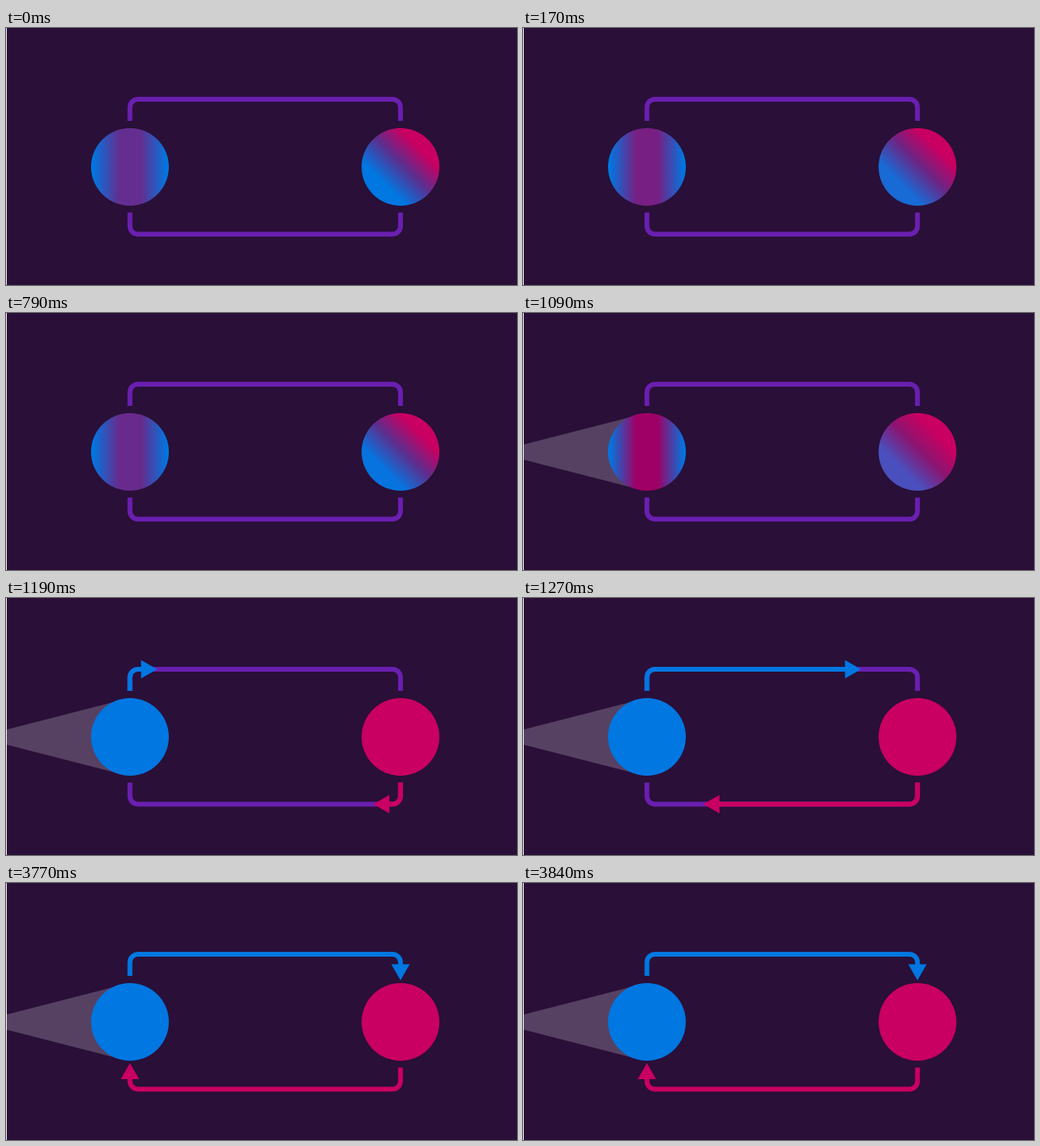
An HTML page with a canvas that plays this animation: 637 by 321 pixels, repeating every 4220 ms.

```html
<!DOCTYPE html>
<html lang="en">
<head>
<meta charset="utf-8">
<title>Two-way exchange</title>
<style>
  html, body { margin: 0; width: 100%; height: 100%; overflow: hidden; background: #2a0f38; }
  canvas { display: block; width: 637px; height: 321px; }
</style>
</head>
<body>
<canvas id="stage"></canvas>
<script>
const W = 637, H = 321, LOOP = 4220;
const BLUE = [0, 119, 225], PINK = [201, 0, 97];
const LEFT = 154.5, RIGHT = 491.75, MID_Y = 173.5, RADIUS = 48.5;
const TOP = 89, START_Y = 116, END_Y = 102, CORNER = 10;

// The picture steps at these times and holds in between.
const STEPS = [0, 70, 140, 210, 270, 340, 410, 470, 560, 660, 730, 790,
  860, 930, 1010, 1090, 1190, 1270, 1350];
const SEND = 1190;

const canvas = document.getElementById('stage');
const ctx = canvas.getContext('2d');
const dpr = window.devicePixelRatio || 1;
canvas.width = W * dpr;
canvas.height = H * dpr;

const clamp = x => Math.max(0, Math.min(1, x));
const rgb = c => `rgb(${c.map(Math.round).join(',')})`;
const mix = (a, b, k) => a.map((v, i) => v + (b[i] - v) * k);

function disc(x, fill) {
  ctx.fillStyle = fill;
  ctx.beginPath();
  ctx.arc(x, MID_Y, RADIUS, 0, Math.PI * 2);
  ctx.fill();
}

function gradient(x0, y0, x1, y1, stops) {
  const g = ctx.createLinearGradient(x0, y0, x1, y1);
  stops.forEach(([at, color]) => g.addColorStop(at, rgb(color)));
  return g;
}

// Draws in the given half: 0 = upper, 1 = lower (upper turned by 180 degrees).
function inHalf(half, draw) {
  ctx.save();
  if (half) {
    ctx.translate(LEFT + RIGHT, 2 * MID_Y - 0.5);
    ctx.rotate(Math.PI);
  }
  draw();
  ctx.restore();
}

function strokeRoute(color, endY, length) {
  ctx.strokeStyle = color;
  ctx.lineWidth = 6;
  ctx.setLineDash(length === undefined ? [] : [length, 2000]);
  ctx.beginPath();
  ctx.moveTo(LEFT, START_Y);
  ctx.arcTo(LEFT, TOP, RIGHT, TOP, CORNER);
  ctx.arcTo(RIGHT, TOP, RIGHT, endY, CORNER);
  ctx.lineTo(RIGHT, endY);
  ctx.stroke();
  ctx.setLineDash([]);
}

const RISE = START_Y - TOP - CORNER;
const BEND = CORNER * Math.PI / 2;
const SPAN = RIGHT - LEFT - 2 * CORNER;
const ROUTE = RISE + 2 * BEND + SPAN + END_Y - TOP - CORNER;

// Position and heading after travelling d along the route.
function pointAt(d) {
  if (d < RISE) return [LEFT, START_Y - d, -Math.PI / 2];
  d -= RISE;
  if (d < BEND) {
    const a = d / CORNER;
    return [LEFT + CORNER * (1 - Math.cos(a)), TOP + CORNER * (1 - Math.sin(a)), a - Math.PI / 2];
  }
  d -= BEND;
  if (d < SPAN) return [LEFT + CORNER + d, TOP, 0];
  d -= SPAN;
  if (d < BEND) {
    const a = d / CORNER;
    return [RIGHT - CORNER * (1 - Math.sin(a)), TOP + CORNER * (1 - Math.cos(a)), a];
  }
  return [RIGHT, TOP + CORNER + d - BEND, Math.PI / 2];
}

function arrow(color, progress) {
  const d = ROUTE * progress;
  strokeRoute(color, END_Y, d);
  const [x, y, angle] = pointAt(d);
  ctx.save();
  ctx.translate(x, y);
  ctx.rotate(angle);
  ctx.fillStyle = color;
  ctx.beginPath();
  ctx.moveTo(-0.5, -11.5);
  ctx.lineTo(19.5, 0);
  ctx.lineTo(-0.5, 11.5);
  ctx.fill();
  ctx.restore();
}

function beam(alpha) {
  ctx.globalAlpha = alpha;
  ctx.fillStyle = '#564162';
  ctx.beginPath();
  ctx.moveTo(0, 164.5);
  ctx.lineTo(142, 128);
  ctx.lineTo(142, 219.5);
  ctx.lineTo(0, 183);
  ctx.fill();
  ctx.globalAlpha = 1;
}

function mixedDiscs(t) {
  const k = 0.5 - 0.5 * Math.cos(t / 720 * Math.PI * 2);
  const core = mix([99, 46, 144], [159, 0, 101], k);
  disc(LEFT, gradient(LEFT - RADIUS, 0, LEFT + RADIUS, 0,
    [[0.02, BLUE], [0.36, core], [0.64, core], [0.98, BLUE]]));

  const low = mix(BLUE, [73, 80, 190], k);
  const middle = mix([92, 46, 142], [140, 20, 112], k);
  const r = RADIUS * Math.SQRT1_2;
  disc(RIGHT, gradient(RIGHT - r, MID_Y + r, RIGHT + r, MID_Y - r,
    [[0.2, low], [0.54, middle], [0.84, PINK]]));
}

function draw(t) {
  ctx.setTransform(dpr, 0, 0, dpr, 0, 0);
  ctx.fillStyle = '#2a0f38';
  ctx.fillRect(0, 0, W, H);

  beam(clamp((t - 860) / 150));

  const sent = 1 - Math.pow(1 - clamp((t - 1180) / 170), 1.75);
  [BLUE, PINK].forEach((color, half) => inHalf(half, () => {
    if (sent < 1) strokeRoute('#6a1fb0', START_Y);
    if (t >= SEND) arrow(rgb(color), sent);
  }));

  if (t < SEND) {
    mixedDiscs(t);
  } else {
    disc(LEFT, rgb(BLUE));
    disc(RIGHT, rgb(PINK));
  }

  ctx.fillStyle = '#f4f1f5';
  ctx.fillRect(0, 0, 1, H);
}

const origin = performance.now();
function tick() {
  const t = (performance.now() - origin) % LOOP;
  draw(STEPS.filter(s => s <= t).pop());
  requestAnimationFrame(tick);
}
tick();
</script>
</body>
</html>
```
